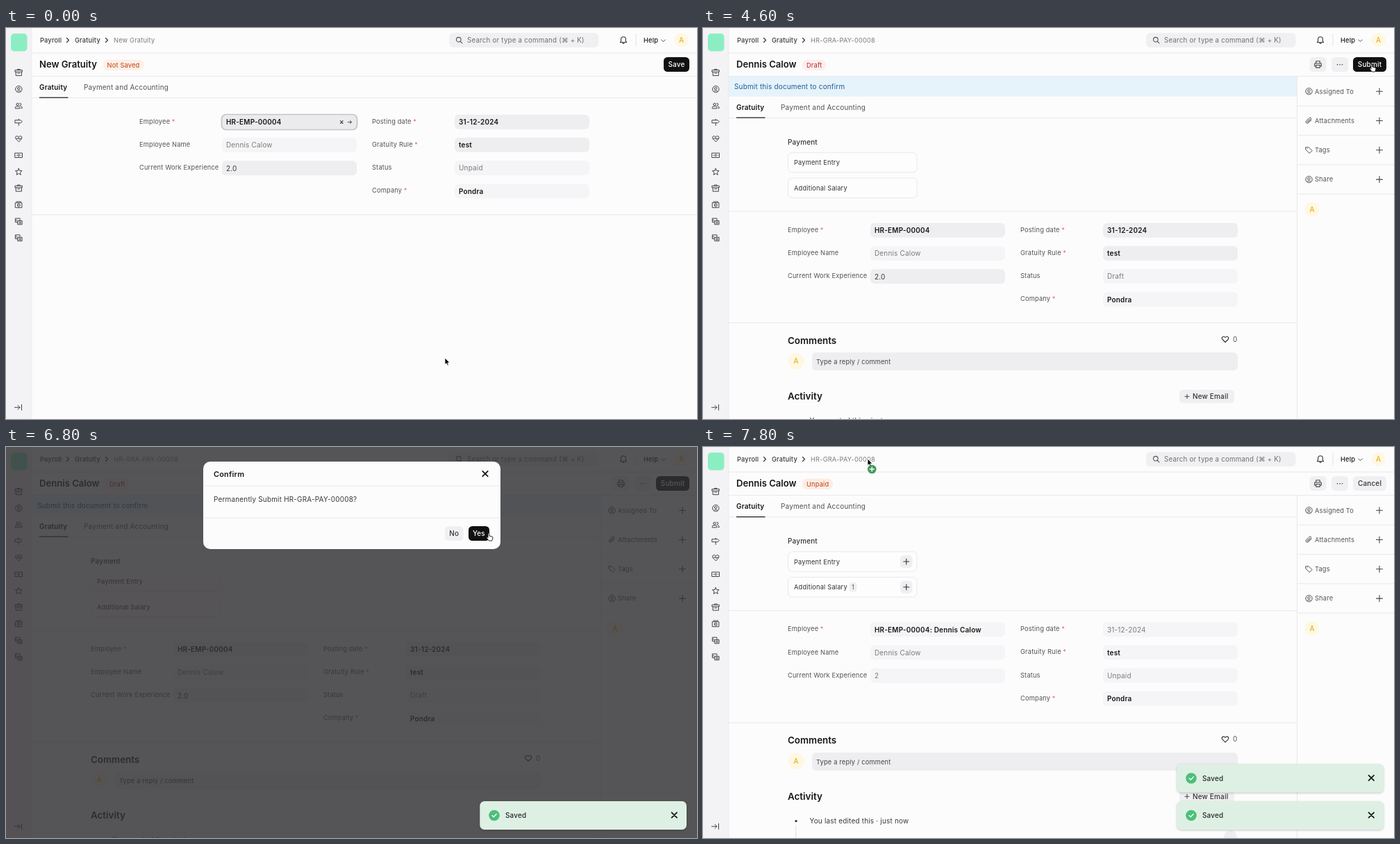
Recreate the animation shown at these times as an HTML page. Size 995 by 563 pixels, loop 8000 ms.

```html
<!DOCTYPE html>
<html lang="en">
<head>
<meta charset="utf-8">
<title>Gratuity form</title>
<style>
html, body { margin: 0; width: 100%; height: 100%; overflow: hidden; background: #fdfcfd; }
svg { display: block; width: 100vw; height: 100vh; }
text { font-family: Inter, "DejaVu Sans", sans-serif; letter-spacing: .02em; }
.toast { filter: drop-shadow(0 1px 1.5px rgba(0, 0, 0, .22)); }
</style>
</head>
<body>
<svg id="stage" viewBox="0 0 995 563"></svg>
<script>
const INK = '#171717', MID = '#525252', SOFT = '#7c7c7c', LINE = '#e9e8ea';
const BASE = 9.95, SMALL = 9.25;
const PERSON = 'Dennis Calow', DOC = 'HR-GRA-PAY-00008';

// Drawing helpers, all return markup
const text = (x, y, s, size = BASE, fill = INK, weight = 400, more = '') =>
  `<text x="${x}" y="${y}" font-size="${size}" fill="${fill}" font-weight="${weight}" ${more}>${s}</text>`;
const mid = (x, y, s, size, fill, weight) => text(x, y, s, size, fill, weight, 'text-anchor="middle"');
const title = (x, y, s, size = 13.4) => text(x, y, s, size, INK, 600, 'style="letter-spacing:0"');
const rect = (x, y, w, h, r, fill, more = '') =>
  `<rect x="${x}" y="${y}" width="${w}" height="${h}" rx="${r}" fill="${fill}" ${more}/>`;
const circle = (x, y, r, fill, more = '') => `<circle cx="${x}" cy="${y}" r="${r}" fill="${fill}" ${more}/>`;
const icon = (x, y, d, color = '#444', width = 1) =>
  `<path transform="translate(${x} ${y})" d="${d}" fill="none" stroke="${color}" stroke-width="${width}" stroke-linecap="round" stroke-linejoin="round"/>`;
const hline = (x, y, w) => rect(x, y - .5, w, 1, 0, LINE);
const group = (id, s, more = '') => `<g id="${id}" ${more}>${s}</g>`;
const shift = (x, y, s) => `<g transform="translate(${x} ${y})">${s}</g>`;
const outline = (x, y, w, h, r, color) => rect(x, y, w, h, r, 'none', `stroke="${color}" stroke-width="1.6"`);
const avatar = (x, y, r) => circle(x, y, r, '#fef8e3') + mid(x, y + 3.5, 'A', BASE, '#e6b325', 500);
const button = (x, w, label, dark) =>
  rect(x, 42, w, 21, 5.5, dark ? '#111' : '#f0eff1') + mid(x + w / 2, 56, label, BASE, dark ? '#fff' : '#333', 500);

const loop = r => `M${-r} 0a${r} ${r} 0 1 0 ${2 * r} 0a${r} ${r} 0 1 0 ${-2 * r} 0`;
const I = {
  box: 'M-5-3.7h10v2.6h-10zM-4.1-1.1v5.4h8.2v-5.4M-1.5.8h3M-1.8-3.7v-1.2h3.6v1.2',
  user: loop(4.7) + 'M-1.7-1a1.7 1.7 0 1 0 3.4 0a1.7 1.7 0 1 0-3.4 0M-3 3.4q3-2.8 6 0',
  users: 'M-3.3-2a1.7 1.7 0 1 0 3.4 0a1.7 1.7 0 1 0-3.4 0M-5 3.6v-1q0-1.6 1.6-1.6h3.4q1.6 0 1.6 1.6v1zM1.6-3.6q2 .1 2 1.7t-2 1.7M3 1q2 .2 2 1.7v.9h-1.4',
  sign: 'M-5-3h8l2 2-2 2h-8zM0-4.6v1.6M0 1v3.8',
  heart: 'M0 4.2L-4 .2Q-5.6-1.8-4-3.4Q-1.8-5 0-2.6Q1.8-5 4-3.4Q5.6-1.8 4 .2z',
  pulse: 'M-3.5-.3h2l1-1.5 1.2 2.8.8-1.3h2',
  cash: 'M-5.2-3.2h10.4v6.4h-10.4z' + loop(1.4) + 'M-3.6 0h.2M3.4 0h.2',
  star: 'M0-4.8L1.4-1.6 4.8-1.4 2.2.9 3 4.3 0 2.5-3 4.3-2.2.9-4.8-1.4-1.4-1.6z',
  safe: 'M-4.6-3h9.2v7h-9.2zM-3.4-4.6h6.8M-2 .5a2 2 0 1 0 4 0a2 2 0 1 0-4 0M-.3.5h.6',
  swap: 'M-1.5 1.2h-3.4v-5.6h6.6v2.4M-1.2-1h6v5.4h-6zM-3.3-2.6v1.8M.4.8h2.8M.4 2.6h2.8',
  collapse: 'M-5 0h7.5M-.5-3l3 3-3 3M5-4v8',
  next: 'M-1.5-3l3 3-3 3',
  down: 'M-2.8-1.3l2.8 2.8 2.8-2.8',
  search: 'M-4-.8a3.3 3.3 0 1 0 6.6 0a3.3 3.3 0 1 0-6.6 0M1.8 1.8l2.6 2.6',
  bell: 'M-4.6 3h9.2l-1.2-1.8v-2.6q0-3.6-3.4-3.6t-3.4 3.6v2.6zM-1.4 3.4q1.4 2.8 2.8 0',
  plus: 'M-4.5 0h9M0-4.5v9',
  cross: 'M-3.7-3.7l7.4 7.4M3.7-3.7l-7.4 7.4',
  clip: 'M3.6-1.2L-.6 3q-1.8 1.6-3.2.2t.2-3.2l4-4q1.4-1.2 2.4-.2t-.2 2.4l-3.6 3.6q-.8.6-1.2.2t.2-1.2l3-3',
  tag: 'M-4.4-4h4.2L4.6.8.8 4.6-4.4-.4zM-2.4-2h.1',
  print: 'M-2.8-1.5v-3.2h5.6v3.2M-2.8 2.5h-2v-4h9.6v4h-2M-2.8 1h5.6v3.6h-5.6z'
};

const shell = () =>
  rect(0, 0, 37, 563, 0, '#f3f2f4') + rect(36.5, 0, .8, 563, 0, LINE) +
  rect(7, 8, 23.5, 25.5, 5, '#8beec3') +
  ['box', 'user', 'users', 'sign', 'heart', 'cash', 'star', 'box', 'safe', 'swap', 'swap']
    .map((k, i) => icon(18.3, 64.3 + i * 23.8, I[k])).join('') +
  icon(18.3, 159.5, I.pulse) + icon(17.5, 546.3, I.collapse) +
  text(49, 20.6, 'Payroll', SMALL, '#383838', 450) + icon(89, 17.5, I.next, '#333', 1.2) +
  text(99, 20.6, 'Gratuity', SMALL, '#383838', 450) + icon(145, 17.5, I.next, '#333', 1.2) +
  rect(638, 7, 215.5, 21, 6, '#f0eff1') + icon(652.5, 17.5, I.search, MID, 1.1) +
  text(664, 20.9, 'Search or type a command (⌘ + K)', 9.75, '#707070') +
  icon(889, 17.7, I.bell, '#333', 1.1) + rect(906.5, 8, 1, 18, 0, '#e2e1e3') +
  text(918, 20.9, 'Help', SMALL, INK, 500) + icon(946.5, 18.2, I.down, MID) + avatar(972.5, 17.3, 10.3) +
  hline(37, 36, 958) + hline(37, 69.5, 958);

const heading = (crumb, name, badge, x, w, color, fill) =>
  text(155, 20.6, crumb, SMALL, SOFT) + title(48, 57, name, 13.1) +
  rect(x, 45.5, w, 15.5, 7, fill) + text(x + 6, 56.5, badge, SMALL, color);

const tabs = (y, w) =>
  text(48, y, 'Gratuity', BASE, INK, 600) + text(112, y, 'Payment and Accounting', BASE, MID) +
  hline(37, y + 11.5, w) + rect(48, y + 10.6, 41.5, 1.2, 0, INK);

// style: b bold, r read-only, * required
function field(x, y, label, value, style = '') {
  const has = c => style.includes(c);
  const star = has('*') ? '<tspan dx="2.5" fill="#e26d6d">*</tspan>' : '';
  return text(x, y + 2.6, label + star, SMALL, MID) +
    rect(x + 119, y - 10.5, 194, 21, 6, has('r') ? '#f5f4f6' : '#eeedef') +
    text(x + 125, y + 3.8, value, BASE, has('b') ? INK : has('r') ? SOFT : '#383838', has('b') ? 600 : 400);
}

const form = (emp, empStyle, years, yearStyle, dateStyle, ruleStyle, status) =>
  field(192, 135.3, 'Employee', emp, empStyle) +
  field(192, 168.5, 'Employee Name', PERSON, 'r') +
  field(192, 201.7, 'Current Work Experience', years, yearStyle) +
  field(527, 135.3, 'Posting date', '31-12-2024', dateStyle) +
  field(527, 168.3, 'Gratuity Rule', 'test', ruleStyle) +
  field(527, 201.5, 'Status', status, 'r') +
  field(527, 234.8, 'Company', 'Pondra', 'br*');

const newForm = () =>
  heading('New Gratuity', 'New Gratuity', 'Not Saved', 139.5, 59, '#bd3e0c', '#fdf0e7') +
  button(947, 37, 'Save', true) + group('saveRing', outline(945.8, 40.8, 39.4, 23.4, 6.5, '#9a9a9a')) +
  tabs(89, 958) + form('HR-EMP-00004', 'b*', '2.0', '', 'b*', 'b*', 'Unpaid') +
  group('focus', rect(310.5, 124.5, 195, 22, 6.5, '#ebeaec', 'stroke="#c5c4c6" stroke-width="1.7"')) +
  group('empFocus', text(317, 139.1, 'HR-EMP-00004', BASE, INK, 600) +
    icon(483.3, 135.5, 'M-1.8-1.8l3.6 3.6M1.8-1.8l-3.6 3.6', '#333', 1.1) +
    icon(495, 135.5, 'M-2.8 0h5.6M.4-2.2l2.3 2.2-2.3 2.2', MID)) +
  group('yearFocus', text(317, 205.5, '2.0', BASE, '#383838')) +
  hline(37, 269, 958);

const card = (y, label, done, count) =>
  rect(122.5, y, 185.5, 28.5, 6, '#fefdfe', `stroke="${LINE}"`) + text(131, y + 17.7, label, SMALL, '#333') +
  (done ? rect(284, y + 5.2, 17.5, 18, 5, '#efeef0') + icon(292.8, y + 14.2, 'M-4 0h8M0-4v8', '#333', 1.1) : '') +
  (count ? rect(211, y + 7.5, 10.5, 13.5, 4, '#efeef0') + mid(216.2, y + 17.4, count, 8.6, MID, 400) : '');

const panel = () =>
  rect(855, 70, 1, 493, 0, LINE) +
  [['user', 'Assigned To'], ['clip', 'Attachments'], ['tag', 'Tags'], ['user', 'Share']].map(([k, s], i) => {
    const y = 91.2 + i * 42.3;
    return icon(872.5, y, I[k], MID) + text(881, y + 3.3, s, SMALL, MID) +
      icon(974, y, I.plus, '#444', 1.1) + hline(855, y + 21, 140);
  }).join('') + avatar(877, 261, 10.6);

const savedForm = done =>
  (done ? heading(DOC, PERSON, 'Unpaid', 143, 44, '#bd3e0c', '#fcede4')
        : heading(DOC, PERSON, 'Draft', 143, 34, '#b52a2a', '#fdeeee')) +
  rect(873.5, 42, 24, 21, 5.5, '#f0eff1') + icon(885.5, 52.5, I.print, '#444', 1.1) +
  rect(905, 42, 24, 21, 5.5, '#f0eff1') + [913.5, 917, 920.5].map(x => circle(x, 52.8, .8, '#333')).join('') +
  (done ? button(936, 48, 'Cancel')
        : button(936, 48, 'Submit', true) + group('submitRing', outline(934.8, 40.8, 50.4, 23.4, 6.5, '#8e8e8e')) +
          rect(37, 70, 818, 28.7, 0, '#e6f3fa') + text(45, 88.2, 'Submit this document to confirm', BASE, '#1f5a96')) +
  shift(0, done ? -28.5 : 0,
    tabs(117.9, 818) + text(122, 167.5, 'Payment', BASE, '#333', 500) +
    card(179.3, 'Payment Entry', done) + card(216, 'Additional Salary', done, done && '1') + hline(37, 264, 818)) +
  shift(-70, done ? 127.5 : 156, done
    ? form('HR-EMP-00004: ' + PERSON, 'br*', '2', 'r', 'r*', 'br*', 'Unpaid')
    : form('HR-EMP-00004', 'b*', '2.0', '', 'b*', 'b*', 'Draft')) +
  shift(0, done ? -27.4 : 0,
    hline(37, 424.5, 818) + title(122, 454.6, 'Comments') +
    icon(752, 448.3, I.heart, '#333', 1.1) + text(763, 451.6, '0', BASE, MID) + avatar(134, 479.7, 12) +
    rect(157, 467.3, 613, 26, 6, '#eeedef') + text(163, 484, 'Type a reply / comment', SMALL, '#444') +
    title(122, 535.3, 'Activity') +
    rect(686, 521, 79, 19, 5, '#f0eff1') + icon(697, 530.6, 'M-3 0h6M0-3v6', '#444') +
    text(705, 534, 'New Email', BASE, '#333', 500) +
    circle(134, 566, 1.7, '#333') + rect(133.2, 572, 1, 20, 0, '#dddcde') +
    text(153.5, 569.4, `You ${done ? 'last edited' : 'created'} this · just now`, BASE, '#383838') +
    circle(759.5, 589, 9.5, '#eeedef')) +
  panel();

const dialog = () =>
  rect(284, 21, 428, 126, 10, '#fdfcfd') +
  text(299, 43, 'Confirm', 10.9, INK, 600) + icon(690, 38.5, I.cross, INK, 1.8) + hline(284, 56, 428) +
  text(299, 79.2, `Permanently Submit ${DOC}?`, BASE, '#383838') + hline(284, 102, 428) +
  shift(0, 72, button(632, 26.5, 'No') + button(666, 30, 'Yes', true));

const toast = id => group(id,
  rect(682.3, 510, 297.7, 41, 6.5, '#def0e4') +
  circle(703, 530.5, 7.8, '#4cbf79') + icon(703, 530.6, 'M-3 0l2.2 2.2 4-4.2', '#fff', 1.4) +
  text(719, 534.2, 'Saved', BASE, '#262626', 500) + icon(962.3, 530, I.cross, INK, 1.8), 'class="toast"');

const cursors =
  group('arrow', '<path d="M0 0V9.6L2.2 7.7 3.7 11.1 5.3 10.4 3.9 7.1 6.8 6.9Z" stroke="#fff" stroke-width=".8"/>') +
  group('hand', '<path d="M-1 .9a1 1 0 0 1 2 0V4l3.9 1q1.3.4 1.1 1.8L5.3 9.4 4.7 11H.4L-2.9 7Q-3.3 5.6-2 5.6L-1 6.6Z" fill="#fff" stroke="#111" stroke-width=".9"/>') +
  group('beam', icon(0, 0, 'M-2.4-5.5Q0-5.5 0-4V4Q0 5.5-2.4 5.5M2.4-5.5Q0-5.5 0-4M2.4 5.5Q0 5.5 0 4M-1.2 1h2.4', '#222', 1.1)) +
  group('badge', circle(6.3, 15, 6.3, '#3f9c57') + icon(6.3, 15, 'M-3 0h6M0-3v6', '#fff', 1.4));

document.getElementById('stage').innerHTML =
  rect(0, 0, 995, 563, 0, '#fdfcfd') + shell() +
  group('fresh', newForm()) + group('draft', savedForm(false)) + group('done', savedForm(true)) +
  group('dim', rect(0, 0, 995, 563, 0, '#313032')) + group('dialog', dialog()) +
  toast('toastA') + toast('toastB') +
  group('haze', rect(0, 0, 995, 563, 0, '#fff')) + group('cursor', cursors);

const el = id => document.getElementById(id);
const show = (id, on) => el(id).setAttribute('display', on ? 'inline' : 'none');
const fade = (id, v) => { el(id).setAttribute('opacity', v); show(id, v > 0); };
const move = (id, s) => el(id).setAttribute('transform', s);
const ramp = (t, a, b) => Math.min(1, Math.max(0, (t - a) / (b - a)));
const easeOut = p => 1 - (1 - p) ** 1.7;
const easeBoth = p => p * p * (3 - 2 * p);

const LOOP = 8000, STEP = 200;
const PATH = [
  [0, 632, 475, 'arrow'], [200, 632, 475, 'arrow'], [1000, 463, 209, 'beam'], [1800, 463, 209, 'arrow'],
  [3200, 970, 38, 'arrow'], [3400, 970, 38, 'arrow'], [3700, 963, 52, 'hand'], [4900, 963, 52, 'hand'],
  [5500, 953, 56, 'hand'], [6000, 953, 56, 'arrow'], [6600, 695, 124, 'hand'], [6900, 695, 124, 'arrow'],
  [7100, 695, 124, 'arrow'], [7800, 237, 17, 'arrow'], [8000, 237, 17, 'arrow']
];

function placeCursor(t) {
  const i = PATH.findLastIndex(k => k[0] <= t);
  const [t0, x0, y0, kind] = PATH[i], [t1, x1, y1] = PATH[i + 1];
  const p = easeBoth(ramp(t, t0, t1));
  move('cursor', `translate(${x0 + (x1 - x0) * p} ${y0 + (y1 - y0) * p})`);
  for (const k of ['arrow', 'hand', 'beam']) show(k, k === kind);
  show('badge', t >= 7800);
}

// Slides in small from the right, then pops to full size
function placeToast(id, t, start, lift) {
  const p = ramp(t, start, start + 600), s = .7 + .3 * ramp(p, .8, 1);
  const x = 831 + 500 * (1 - easeBoth(ramp(p, 0, .8))), y = 530.5 - lift;
  fade(id, p > 0 ? s : 0);
  move(id, `translate(${x} ${y}) scale(${s}) translate(-831 -530.5)`);
}

function draw(t) {
  show('fresh', t < 4600);
  show('draft', t >= 4600 && t < 7200);
  show('done', t >= 7200);

  const emp = t < 1000, year = t >= 1000 && t < 2600;
  show('focus', emp || year);
  move('focus', `translate(0 ${year ? 66.4 : 0})`);
  show('empFocus', emp);
  show('yearFocus', year);
  show('saveRing', t >= 3800);
  show('submitRing', t >= 5800 && t < 6200);

  // The dialog fades while a white haze covers the still dimmed page
  fade('dim', .82 * ramp(t, 5900, 6050) * (1 - ramp(t, 7050, 7200)));
  fade('dialog', ramp(t, 6000, 6150) * (1 - ramp(t, 6940, 7025)));
  move('dialog', `translate(0 ${-50 * (1 - easeOut(ramp(t, 6000, 6300)) + easeOut(ramp(t, 6940, 7240)))})`);
  fade('haze', .31 * ramp(t, 6940, 7000) * (1 - ramp(t, 7050, 7200)));

  placeToast('toastA', t, 4900, t >= 7300 ? 53.5 : 0);
  placeToast('toastB', t, 7200, 0);
  placeCursor(t);
}

const start = performance.now();
function tick() {
  const t = (performance.now() - start) % LOOP;
  draw(Math.floor(t / STEP) * STEP);
  requestAnimationFrame(tick);
}
tick();
</script>
</body>
</html>
```
